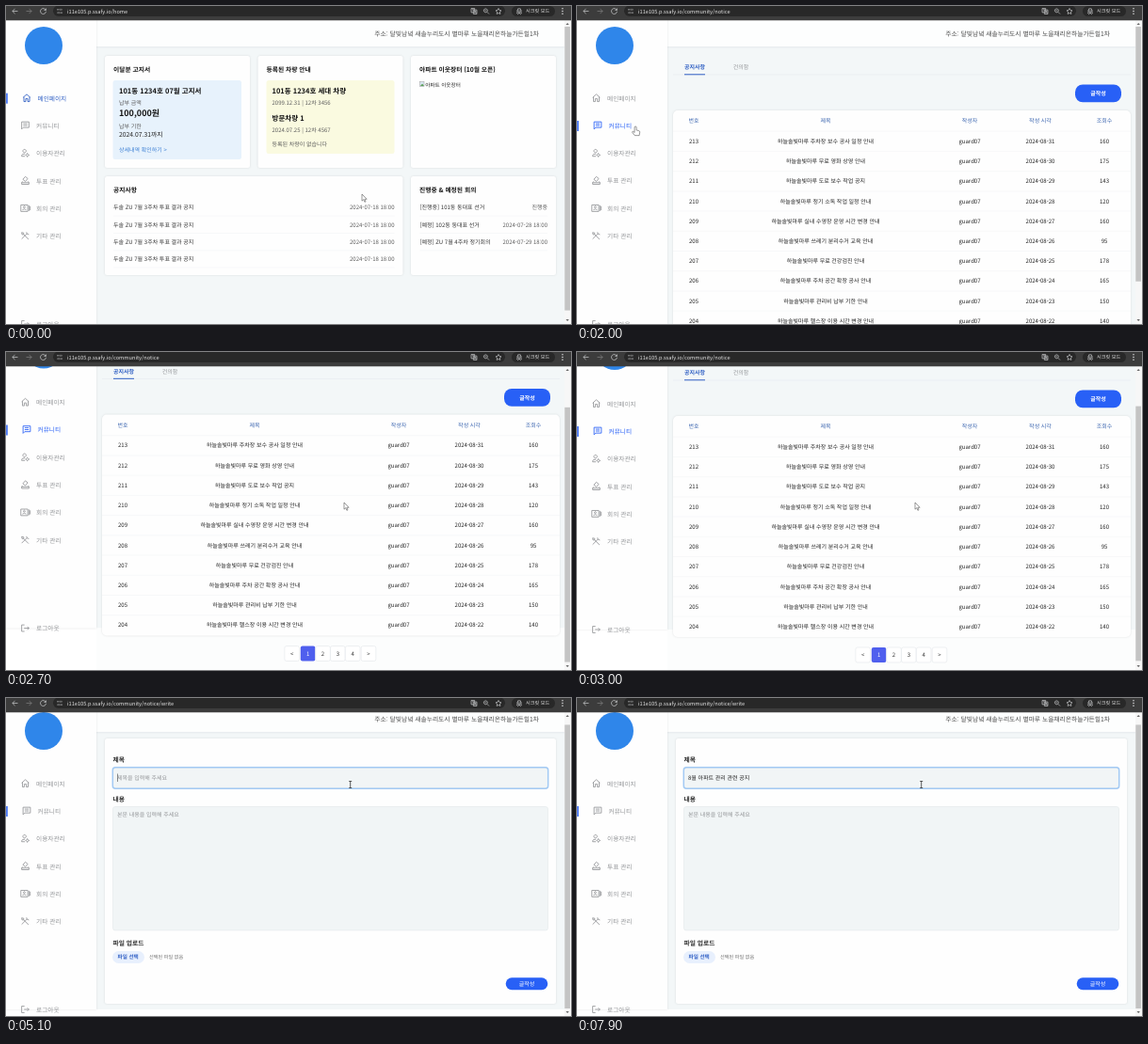
Recreate the animation shown at these times as an HTML page. Size 600 by 338 pixels, loop 8 s.

```html
<!DOCTYPE html>
<html lang="ko">
<head>
<meta charset="utf-8">
<style>
html, body { margin: 0; width: 100%; height: 100%; overflow: hidden; background: #fff; }
svg { display: block; width: 600px; height: 338px; }
text { font-family: "Noto Sans CJK KR", "Noto Sans", sans-serif; text-rendering: geometricPrecision; white-space: pre; }
.b { font-weight: 700; }
.w { font-weight: 500; }
.m { text-anchor: middle; }
.e { text-anchor: end; }
.card { fill: #fefefe; filter: drop-shadow(0 .8px 1.3px #0000001c); }
.icon { fill: none; stroke-width: 2; }
</style>
</head>
<body>
<svg id="stage" viewBox="0 0 600 338"></svg>
<script>
const BLUE = '#2860f6', NAVY = '#2f5fc4', GRAY = '#949699', DIM = '#5c5c5c', INK = '#151515';

// Drawing helpers; text y is the vertical middle of the line.
const text = (x, y, size, str, fill = INK, cls = '', id = '') =>
  `<text x="${x}" y="${y}" dy=".36em" font-size="${size}" fill="${fill}" class="${cls}" id="${id}">${str.replace(/&/g, '&amp;').replace(/</g, '&lt;')}</text>`;
const rect = (x, y, w, h, r, attrs) =>
  `<rect x="${x}" y="${y}" width="${w}" height="${h}" rx="${r}" ${attrs}/>`;
const fill = c => `fill="${c}"`;
const card = (x, y, w, h, r = 2.5) => rect(x, y, w, h, r, 'class="card"');
const line = (x1, x2, y, c = '#eef0f2', w = .5) =>
  `<path d="M${x1} ${y}H${x2}" stroke="${c}" stroke-width="${w}"/>`;
const icon = (x, y, d, c, scale = .43) =>
  `<path class="icon" stroke="${c}" transform="translate(${x} ${y}) scale(${scale}) translate(-12 -12)" d="${d}"/>`;

const menu = [
  ['메인페이지', 'M3 11l9-8 9 8M5 9.500V21h4.500v-7h5v7H19V9.500'],
  ['커뮤니티', 'M3 21V3h18v14H7zM7 7.500h10M7 12h10'],
  ['이용자관리', 'M10 11a4 4 0 1 0-.01 0M11 20H3v-2q0-4 8-4M17 14a3 3 0 1 0 .01 0M17 12v2M17 20v2M12 17h2M20 17h2'],
  ['투표 관리', 'M5 14l-2 3v4h18v-4l-2-3M3 17h18M6 9l6-7 6 5-6 7z'],
  ['회의 관리', 'M1 4h17v16H1zM21 5v14M24 7v10M9.500 11a2 2 0 1 0-.01 0M5 16q4.500-4 9 0'],
  ['기타 관리', 'M3 20L16 7M15 3q-1 6 6 6M20 21L8 9M3 4l5 1v4H4z'],
];

function sidebar(active, color) {
  const items = menu.map(([label, path], i) => {
    const y = 98.2 + i * 29.3, on = i === active, c = on ? color : GRAY, x = on ? 1.5 : 0;
    return (on ? rect(.2, y - 5.5, 1.5, 11, 0, fill(BLUE)) : '') +
      icon(20.5 + x, y - .5, path, c) + text(32 + x, y, 6.7, label, c, on && color !== GRAY ? 'w' : '');
  });
  return rect(0, 11, 96, 327, 0, 'class="card"') + '<circle cx="40" cy="42" r="20" fill="#2f86ea"/>' +
    items.join('') + icon(20.5, 338, 'M10 4H3v16h7M9 12h12M17 8l4 4-4 4', GRAY) + text(32, 338.5, 6.7, '로그아웃', GRAY);
}

const frame = (id, active, color, content) => `<g id="${id}">` +
  rect(96, 11, 497, 327, 0, fill('#f3f7f8')) +
  rect(96, 11, 497, 32.7, 0, fill('#fdfefe')) + line(96, 593, 43.8, '#dfe4e7', .8) +
  text(566, 30, 6.75, '주소: 달빛남녘 새솔누리도시 별마루 노을채리온하늘가든힐1차', '#4a4a4a', 'e') +
  content + sidebar(active, color) + '</g>';

function dashboard() {
  const rowY = i => 214.2 + i * 18.3;
  const list = (x1, x2, rows) => rows.map(([a, b], i) =>
    text(x1, rowY(i), 6, a, '#333') + text(x2, rowY(i), 6, b, DIM, 'e') + line(x1, x2, rowY(i) + 9)).join('');
  const title = (x, y, s) => text(x, y, 6.75, s, INK, 'b');
  return card(105, 53, 154, 119) + card(267.5, 53, 154, 119) + card(430, 53, 154, 119) +
    card(105, 181, 316.5, 105) + card(430, 181, 154, 105) +
    title(114, 68, '이달분 고지서') + title(276.5, 68, '등록된 차량 안내') +
    title(439, 68, '아파트 이웃장터 (10월 오픈)') + title(114, 195.5, '공지사항') + title(439, 195.5, '진행중 & 예정된 회의') +
    rect(113.5, 79, 136.5, 84, 2.5, fill('#e7f2fc')) + rect(276.5, 79, 136, 78, 2.5, fill('#fafae0')) +
    text(120, 90.5, 7.5, '101동 1234호 07월 고지서', INK, 'b') + text(120, 103, 6, '납부 금액', DIM) +
    text(120, 114, 9, '100,000원', INK, 'b') + text(120, 127.5, 6, '납부 기한', DIM) +
    text(120, 137, 6.8, '2024.07.31까지', '#222') + text(120, 153, 6, '상세내역 확인하기 >', '#3b7fd4') +
    text(282.5, 90.5, 7.5, '101동 1234호 세대 차량', INK, 'b') + text(282.5, 103, 6, '2099.12.31 | 12차 3456', DIM) +
    text(282.5, 119, 7.5, '방문차량 1', INK, 'b') + text(282.5, 132, 6, '2024.07.25 | 12차 4567', DIM) +
    text(282.5, 147, 6, '등록된 차량이 없습니다', DIM) +
    rect(439.5, 80.5, 4.5, 5, 0, 'fill="#dce8f5" stroke="#999" stroke-width=".5"') +
    '<path d="M440 85l2-2.500 2 2.500z" fill="#5a9e55"/>' + text(445.2, 83.5, 5.6, '아파트 이웃장터', '#222') +
    list(114, 412.5, Array(4).fill(['두솔 ZU 7월 3주차 투표 결과 공지', '2024-07-18 18:00'])) +
    list(439.5, 575, [['[진행중] 101동 동대표 선거', '진행중'], ['[예정] 102동 동대표 선거', '2024-07-28 18:00'],
      ['[예정] ZU 7월 4주차 정기회의', '2024-07-29 18:00']]);
}

function board() {
  const columns = [124, 264, 417, 492, 560];
  const row = (cells, y, color, cls) => cells.map((s, i) => text(columns[i], y, 6, s, color, 'm ' + cls)).join('');
  const posts = [['주차장 보수 공사 일정', 160], ['무료 영화 상영', 175], ['도로 보수 작업 공지', 143],
    ['정기 소독 작업 일정', 120], ['실내 수영장 운영 시간 변경', 160], ['쓰레기 분리수거 교육', 95], ['무료 건강검진', 178],
    ['주차 공간 확장 공사', 165], ['관리비 납부 기한', 150], ['헬스장 이용 시간 변경', 140]];
  const rows = posts.map(([topic, views], i) => {
    const y = 143.8 + i * 21.22, tail = topic.endsWith('공지') ? '' : ' 안내';
    return line(102, 588, y - 10.6) +
      row([`${213 - i}`, `하늘솔빛마루 ${topic}${tail}`, 'guard07', `2024-08-${31 - i}`, `${views}`], y, '#222', '');
  });
  const pages = ['<', '1', '2', '3', '4', '>'].map((s, i) => {
    const x = [303.7, 320.6, 336.5, 352.3, 368.2, 385][i], on = s === '1';
    return rect(x - 7.8, 357, 15.6, 16, 2, on ? fill('#4f5fee') : 'fill="#fff" stroke="#e3e6ea" stroke-width=".6"') +
      text(x, 365.3, 6, s, on ? '#fff' : '#333', 'm');
  });
  return rect(96, 338, 497, 45, 0, fill('#fcfdfd')) +
    text(125, 65, 6, '공지사항', NAVY, 'm b') + text(174, 65, 6, '건의함', GRAY, 'm') +
    line(102, 588, 73, '#e2e7ec') + line(114, 136, 72.8, NAVY, 1) +
    rect(529, 83.5, 49, 18.8, 8, fill(BLUE)) + text(553.5, 93, 6, '글작성', '#fff', 'm b') +
    card(102, 111, 486, 235, 5) + row(['번호', '제목', '작성자', '작성 시각', '조회수'], 122.2, '#3c66b0', 'w') +
    rows.join('') + pages.join('');
}

function editor() {
  const box = (y, h) => rect(113.5, y, 462, h, 2.5, 'fill="#f1f5f6" stroke="#e2e7ea" stroke-width=".6"');
  const label = (y, s) => text(113.5, y, 6.75, s, '#2c2c2c', 'b');
  return card(105, 50, 479, 282) + label(73, '제목') + box(81, 22) +
    rect(113.3, 80.7, 462.4, 22.6, 3, 'id="ring" fill="none" stroke="#a3caf4" stroke-width="1.5"') +
    text(118, 92.3, 6, '제목을 입력해 주세요', GRAY, '', 'hint') + text(118, 92.3, 6, '', '#222', '', 'typed') +
    rect(0, 87.5, .5, 8.5, 0, 'id="caret" fill="#222"') +
    label(115, '내용') + box(122.5, 131.5) + text(118, 131, 6, '본문 내용을 입력해 주세요', GRAY) +
    label(267.5, '파일 업로드') + rect(113, 276, 34, 13, 6.5, fill('#e8f0fd')) +
    text(129.7, 282.3, 5.6, '파일 선택', NAVY, 'm b') + text(152, 282.3, 5.2, '선택된 파일 없음', '#707070') +
    rect(530.7, 304.3, 44.6, 12.9, 6.4, fill(BLUE)) + text(553, 310.8, 6, '글작성', '#fff', 'm w');
}

function browser() {
  const c = '#d5d6d8', s = .33;
  return rect(593, 11, 7, 327, 0, fill('#f7f7f7')) + rect(593.3, 0, 5.7, 0, 0, 'id="thumb" fill="#c4c4c4"') +
    '<path d="M594.500 20l1.700-2 1.700 2zM594.500 333l1.700 2 1.700-2z" fill="#666"/>' +
    rect(0, 0, 600, 15.3, 0, fill('#3c3c3c')) + rect(50, -.5, 480, 11.5, 5.7, fill('#282828')) + rect(537, 0, 46, 11, 5.5, fill('#282828')) +
    icon(9.5, 5.5, 'M21 12H4M12 4l-8 8 8 8', c, s) + icon(24.5, 5.5, 'M3 12h17M12 4l8 8-8 8', '#858585', s) +
    icon(39.5, 5.5, 'M20 8a9 9 0 1 0 1 5M21 3v6h-6', c, s) + icon(57, 5.5, 'M3 7h8M19 7h2M15 4v6M21 17h-8M5 17H3M9 14v6', c, s) +
    text(65, 5.6, 5.65, '', '#e3e3e3', '', 'url') +
    icon(497, 5.5, 'M3 3h11v13H3zM10 8h11v13H10zM5.500 7h6M15 18l2-6 2 6', c, s) +
    icon(510, 5.5, 'M10 16a6 6 0 1 0-.01 0M14.500 14.500L21 21M7 10h6', c, s) +
    icon(523, 5.5, 'M12 3l3 6 6 1-4.500 4 1 7-5.500-3-5.500 3 1-7L3 10l6-1z', c, s) +
    icon(545, 5.5, 'M3 11h18M7 10l1-6h8l1 6M8 15a3 3 0 1 0 .01 0M16 15a3 3 0 1 0 .01 0', c, s) +
    text(552, 5.6, 5.2, '시크릿 모드', '#e3e3e3') +
    [2.7, 5.5, 8.3].map(y => `<circle cx="591" cy="${y}" r=".8" fill="${c}"/>`).join('');
}

const cursors = `<g id="cursor" fill="#fff" stroke="#555" stroke-width=".6" stroke-linejoin="round">
  <path id="arrow" d="M0 0v7.200l1.700-1.500 1.200 2.600 1.100-.5-1.200-2.500h2.300z"/>
  <path id="hand" d="M-1 1a1 1 0 0 1 2 0v3l2.700.7q1 .3.9 1.500l-.6 3.500h-4.800L-3.500 6.200q0-1 1-.8L-1 6.500z"/>
  <path id="beam" d="M-1.500-3.500H1.500M0-3.500V3.500M-1.500 3.500H1.500" stroke="#333" stroke-width=".8"/></g>`;

stage.innerHTML = frame('page0', 0, NAVY, dashboard()) + frame('page1', 1, BLUE, board()) +
  frame('page2', 1, GRAY, editor()) + browser() + cursors;
const $ = id => document.getElementById(id);
const show = (id, on) => $(id).setAttribute('display', on ? 'inline' : 'none');

// Eased position on a list of [time, ...values].
function along(keys, t) {
  const n = keys.findIndex(k => k[0] > t);
  if (n < 1) return keys.at(n).slice(1);
  const [a, b] = [keys[n - 1], keys[n]], p = (t - a[0]) / (b[0] - a[0]), e = p * p * (3 - 2 * p);
  return a.slice(1).map((v, i) => v + (b[i + 1] - v) * e);
}

// Every state of the text as Hangul syllables are composed key by key.
function typingSteps(str) {
  const leads = 'ㄱㄲㄴㄷㄸㄹㅁㅂㅃㅅㅆㅇㅈㅉㅊㅋㅌㅍㅎ';
  let done = '';
  return [...str].flatMap(ch => {
    const n = ch.charCodeAt(0) - 0xac00, steps = [];
    if (n >= 0) steps.push(leads[Math.floor(n / 588)]);
    if (n >= 0 && n % 28) steps.push(String.fromCharCode(0xac00 + n - n % 28));
    const states = [...steps, ch].map(s => done + s);
    done += ch;
    return states;
  });
}

const urls = ['home', 'community/notice', 'community/notice/write'], heights = [334, 372, 334];
const steps = typingSteps('8월 아파트 관리 관련 공지');
const firstKeys = [5500, 5600, 5900, 6000];
const blinks = [4200, 4500, 4700, 4900, 5100, 5300, 5500, 6200, 6400, 7850];
const pointer = [[0, 378, 200], [100, 378, 200], [800, 45, 250], [1000, 46, 224], [1400, 46.5, 200], [1800, 44, 126],
  [1950, 44, 126], [2300, 359, 160], [3050, 359, 160], [3450, 556, 50], [3650, 556, 50], [3950, 365.7, 92]];
const scrolling = [[2000, 0], [2300, 45], [2600, 45], [2900, 43]];

function draw(t) {
  const page = t < 1900 ? 0 : t < 3560 ? 1 : 2;
  const scroll = page === 1 ? along(scrolling, t)[0] : page ? 7 : 0;
  urls.forEach((_, i) => show('page' + i, i === page));
  $('page' + page).setAttribute('transform', `translate(0 ${-scroll})`);
  $('url').textContent = 'i11e105.p.ssafy.io/' + urls[page];
  $('thumb').setAttribute('y', 22 + 308 * scroll / heights[page]);
  $('thumb').setAttribute('height', 308 * 327 / heights[page]);

  const past = list => list.filter(x => x <= t).length;
  const count = t < 6450 ? past(firstKeys) : 5 + Math.floor((t - 6450) / 54);
  const typed = count ? steps[Math.min(count, steps.length) - 1] : '';
  $('typed').textContent = typed;
  show('hint', !typed);
  show('ring', t >= 4200);
  show('caret', past(blinks) % 2);
  if (page === 2) $('caret').setAttribute('x', 118 + (typed ? $('typed').getComputedTextLength() + 1 : 0));

  const [x, y] = along(pointer, t);
  const shape = x < 96 || (page === 1 && x > 529) ? 'hand' : page === 2 && y > 74 && x < 575 ? 'beam' : 'arrow';
  $('cursor').setAttribute('transform', `translate(${x} ${y})`);
  ['arrow', 'hand', 'beam'].forEach(id => show(id, id === shape));
}

function tick() {
  draw(performance.now() % 8000);
  requestAnimationFrame(tick);
}
tick();
</script>
</body>
</html>
```
